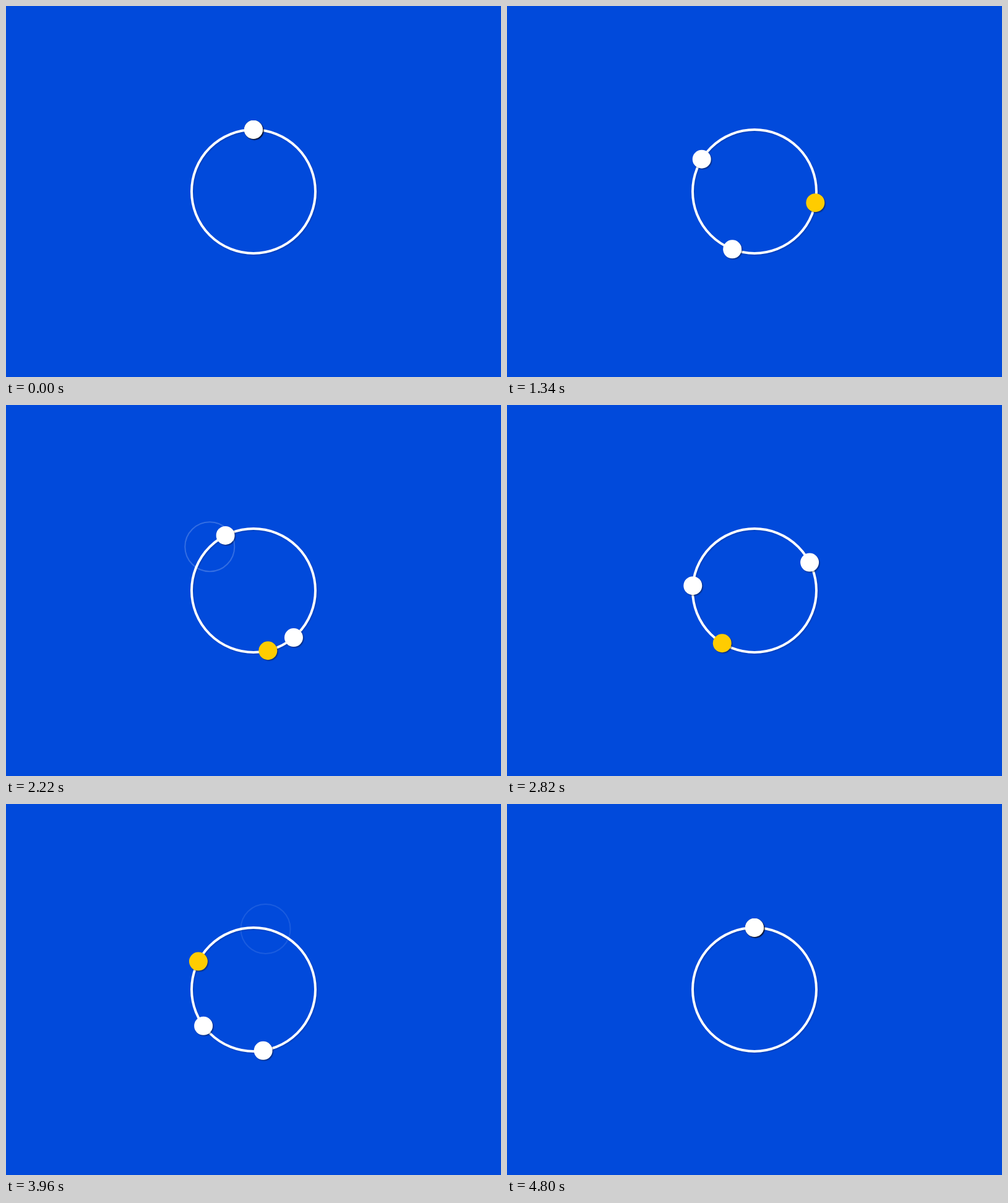
Animation of 800x600 px, one loop 4820 ms. Source, as an HTML page with a canvas:

```html
<!DOCTYPE html>
<html lang="en">
<head>
<meta charset="utf-8">
<title>Orbiting dots</title>
<style>
  html, body { margin: 0; width: 100%; height: 100%; overflow: hidden; background: #014adb; }
  canvas { display: block; }
</style>
</head>
<body>
<canvas id="stage" width="800" height="600"></canvas>
<script>
const ctx = document.getElementById('stage').getContext('2d');
const TAU = Math.PI * 2;
const LOOP = 4820, STEP = 20, TURN = 4800;
const CENTER = { x: 400, y: 300 }, ORBIT = 100;

// Painted in this order, so the fastest dot lies on top.
const dots = [
  { turns: 1, color: '#ffcc00' },
  { turns: 2, color: '#ffffff' },
  { turns: 3, color: '#ffffff' }
];

// Translucent pulses that swell and fade on the orbit; angles in degrees from the top.
const pulses = [
  { peak: 640, angle: 54, radius: 35, alpha: 0.2, filled: true },
  { peak: 2220, angle: 315, radius: 40, alpha: 0.2 },
  { peak: 3960, angle: 11.25, radius: 40, alpha: 0.1 }
];
const PULSE_FADE = 240;

function onOrbit(angle) {
  return {
    x: CENTER.x + ORBIT * Math.sin(angle),
    y: CENTER.y - ORBIT * Math.cos(angle)
  };
}

function circle({ x, y }, radius) {
  ctx.beginPath();
  ctx.arc(x, y, radius, 0, TAU);
}

function setShadow(alpha) {
  ctx.shadowColor = `rgba(0, 0, 0, ${alpha})`;
  ctx.shadowOffsetX = ctx.shadowOffsetY = 1.5;
  ctx.shadowBlur = 1.5;
}

function drawTrack() {
  ctx.save();
  setShadow(0.15);
  ctx.strokeStyle = '#ffffff';
  ctx.lineWidth = 4;
  circle(CENTER, ORBIT);
  ctx.stroke();
  ctx.restore();
}

function drawDot(dot, time) {
  ctx.save();
  setShadow(0.4);
  ctx.fillStyle = dot.color;
  circle(onOrbit(TAU * dot.turns * time / TURN), 15);
  ctx.fill();
  ctx.restore();
}

function drawPulse(pulse, time) {
  const strength = 1 - Math.abs(time - pulse.peak) / PULSE_FADE;
  if (strength <= 0) return;
  ctx.save();
  ctx.globalAlpha = pulse.alpha * strength;
  ctx.fillStyle = ctx.strokeStyle = '#ffffff';
  ctx.lineWidth = 2;
  circle(onOrbit(pulse.angle * TAU / 360), pulse.radius);
  if (pulse.filled) ctx.fill();
  else ctx.stroke();
  ctx.restore();
}

function draw(time) {
  ctx.fillStyle = '#014adb';
  ctx.fillRect(0, 0, 800, 600);
  drawTrack();
  dots.forEach(dot => drawDot(dot, time));
  pulses.forEach(pulse => drawPulse(pulse, time));
}

function tick() {
  const time = performance.now() % LOOP;
  draw(Math.floor(time / STEP) * STEP);
  requestAnimationFrame(tick);
}
tick();
</script>
</body>
</html>
```
